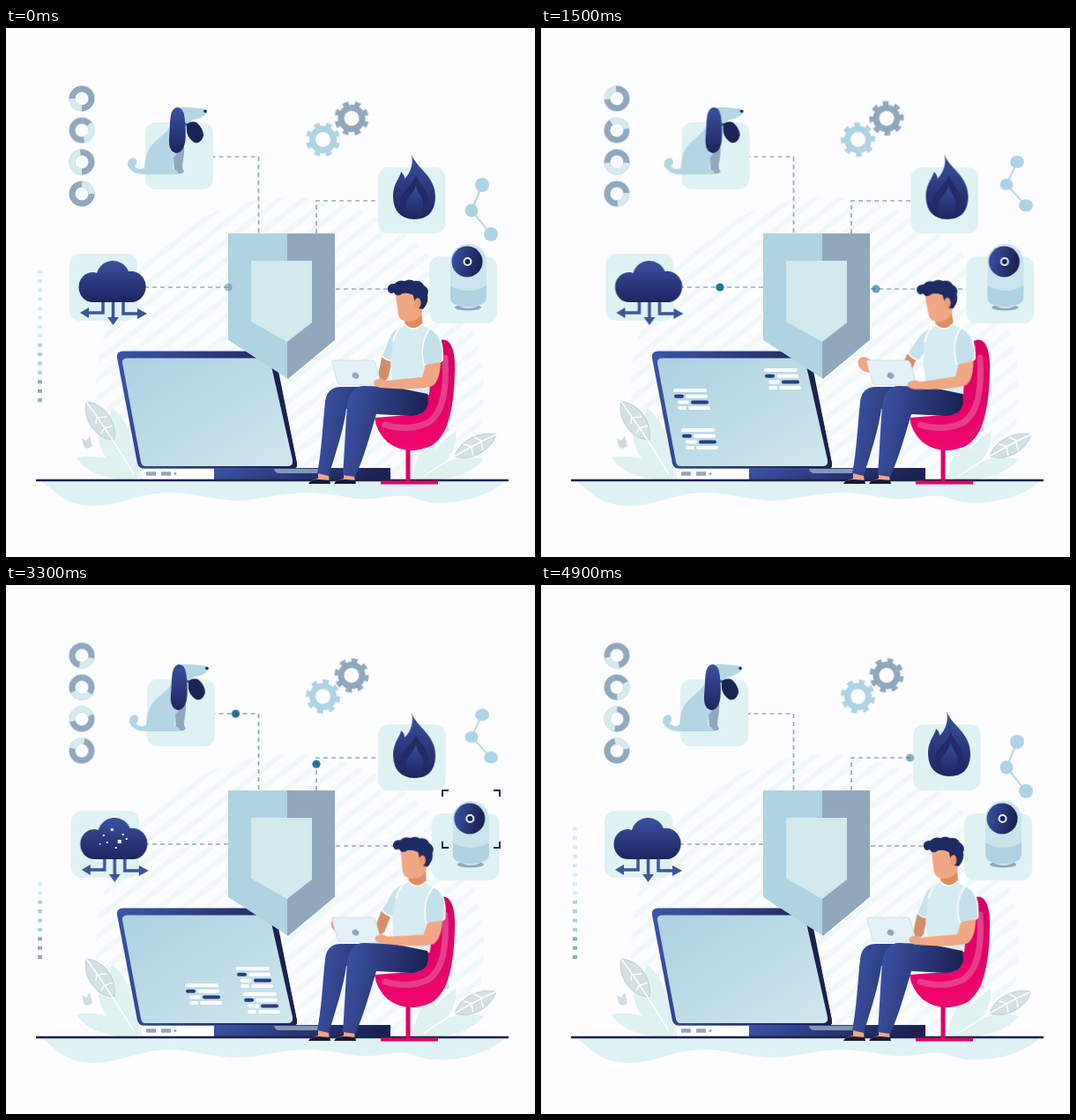
Write an HTML page that moves like this. It is 600 px wide and 600 px high and loops after 5000 ms.

```html
<!DOCTYPE html>
<html lang="en">
<head>
<meta charset="utf-8">
<title>Smart security</title>
<style>
html, body { margin: 0; width: 100%; height: 100%; overflow: hidden; background: #fdfcff; }
svg { display: block; width: 100vw; height: 100vh; }

/* half a sine wave each way, 5 s there and back */
.wave { animation: 2.5s cubic-bezier(.364, 0, .636, 1) infinite alternate; }
.mid { animation-delay: -1.25s; }
.drift { animation-name: drift; }
.turn { animation-name: turn; }
.back { animation-name: back; }
.gear { animation-name: gear; }
.atoms { animation-name: atoms; }
.sway { animation-name: sway; transform-origin: 458px 432px; }
@keyframes drift { to { transform: translateX(var(--dx)); } }
@keyframes turn { from { transform: rotate(-90deg); } to { transform: rotate(90deg); } }
@keyframes back { from { transform: rotate(90deg); } to { transform: rotate(-90deg); } }
@keyframes gear { from { transform: rotate(-45deg); } to { transform: rotate(90deg); } }
@keyframes atoms {
  from { transform: translateY(178px) scaleY(1); }
  to { transform: translateY(138px) scaleY(.82); }
}
@keyframes sway { from { transform: rotate(3deg); } to { transform: rotate(-3deg); } }

.loop { animation: 5s linear infinite; }
.fire { animation-name: fire; animation-timing-function: ease-in-out; }
@keyframes fire {
  0%, 100% { transform: none; }
  38% { transform: translateX(-2.7px); }
  80% { transform: translateX(1px); }
}
.bob { animation-name: bob; }
@keyframes bob { 0%, 44%, 94%, 100% { transform: none; } 62%, 84% { transform: translateY(2px); } }
.ladder { animation-name: ladder; }
@keyframes ladder {
  0%, 94%, 100% { clip-path: inset(0); }
  20% { clip-path: inset(88% 0 0); }
  26%, 41% { clip-path: inset(100% 0 0); }
  44% { clip-path: inset(88% 0 0); }
  66% { clip-path: inset(40% 0 0); }
  80% { clip-path: inset(12% 0 0); }
}
.spark { animation-name: spark; }
@keyframes spark {
  0%, 14%, 27%, 36%, 51%, 56%, 74%, 100% { opacity: 0; transform: translateY(5px); }
  18%, 24%, 41%, 47%, 60%, 69% { opacity: 1; transform: none; }
}
.corner { animation-name: corner; }
@keyframes corner {
  0%, 51% { transform: scale(.2); opacity: 0; }
  52% { transform: scale(.2); opacity: 1; }
  58%, 72% { transform: none; opacity: 1; }
  80% { transform: scale(.2); opacity: 1; }
  82%, 100% { transform: scale(.2); opacity: 0; }
}
.shine { animation-name: shine; }
@keyframes shine {
  0%, 69% { transform: translateX(-170px); }
  80% { transform: none; }
  92%, 100% { transform: translateX(185px); }
}
.hand { animation-name: hand; animation-timing-function: ease-in-out; }
@keyframes hand {
  0%, 6%, 80%, 100% { transform: translate(24px, 8px); }
  20% { transform: translate(4px, 7px); }
  30% { transform: none; }
  44% { transform: translate(3px, -1px); }
  66% { transform: translate(9px, 5px); }
}
.arm { animation-name: arm; transform-origin: 444px 344px; }
@keyframes arm { 0%, 6%, 80%, 100% { transform: none; } 28%, 46% { transform: rotate(16deg); } }
</style>
</head>
<body>
<svg viewBox="0 0 600 600" fill="none">
<defs>
  <linearGradient id="navy" x2="0" y2="1"><stop stop-color="#3a519f"/><stop offset="1" stop-color="#1d2560"/></linearGradient>
  <linearGradient id="leg" x1="0" x2="1" y2=".2"><stop stop-color="#3c55a8"/><stop offset="1" stop-color="#1b2152"/></linearGradient>
  <linearGradient id="glass" x2="1" y2="1"><stop stop-color="#abd1e1"/><stop offset="1" stop-color="#cfe7ee"/></linearGradient>
  <linearGradient id="pink" x2="0" y2="1"><stop stop-color="#d4005f"/><stop offset="1" stop-color="#f0066f"/></linearGradient>
  <pattern id="stripes" width="17" height="17" patternUnits="userSpaceOnUse" patternTransform="rotate(-38)"><path d="M0 4H17" stroke="#f0f8f9" stroke-width="6"/></pattern>
  <clipPath id="sky"><path d="M0 0H600V512H0z"/></clipPath>
  <clipPath id="shield"><path d="M252 233H373V354L320 398L252 354z"/></clipPath>
</defs>

<!-- backdrop -->
<circle cx="322" cy="412" r="220" fill="url(#stripes)" clip-path="url(#sky)"/>
<path d="M38 514C55 520 60 541 98 542C132 542 150 527 185 527S245 541 285 534S345 524 385 532S440 524 465 534S540 538 566 514z" fill="#dff2f3"/>
<g fill="#dff1f1">
  <path d="M146 510C118 490 112 455 120 431C138 442 148 475 152 510z"/>
  <path d="M146 510C118 500 104 480 104 457C126 462 142 485 150 510z"/>
  <path d="M150 511C120 515 90 505 80 487C108 482 135 494 150 511z"/>
  <path d="M468 510C480 485 494 466 510 458C513 480 494 502 474 512z"/>
  <path d="M468 512C490 490 520 483 542 489C526 508 495 515 468 512z"/>
  <path d="M462 510C462 492 472 474 486 468C490 485 480 502 466 512z"/>
</g>
<g fill="#d3e0e4" stroke="#b4c6cd" stroke-width=".8">
  <path d="M91 424C110 425 126 445 123 467C105 468 86 446 91 424z"/>
  <path d="M91 424Q112 452 145 506M103 440L102 449M112 453L108 460M104 442L114 441M112 454L121 451" fill="none" stroke="#fff" stroke-width="1.4"/>
  <path d="M556 461C537 457 514 468 509 486C528 491 549 481 556 461z"/>
  <path d="M556 461Q522 476 474 508M541 469L531 464M530 475L519 472M539 470L541 479M528 476L530 485" fill="none" stroke="#fff" stroke-width="1.4"/>
</g>
<path d="M86 465L91 468L95 462L98 474Q91 480 88 474zM496 450L500 446L503 457L496 459z" fill="#cfdde2"/>

<!-- left column -->
<g id="rings"></g>
<g id="ladder" class="loop ladder"></g>

<!-- gears -->
<g id="gears"></g>

<!-- molecule -->
<g class="wave atoms">
  <path d="M540 0L528 29L550 56" stroke="#b6d7e5" stroke-width="2"/>
  <g fill="#aed3e4"><circle cx="540" r="8"/><circle cx="528" cy="29" r="7.5"/><circle cx="550" cy="56" r="8"/></g>
</g>

<!-- wires -->
<g stroke="#91abc1" stroke-width="1.7" stroke-dasharray="5 4">
  <path d="M286.500 232V146H235"/><path d="M352 233V196H422"/>
  <path d="M252 294H158"/><path d="M374 296H482"/>
</g>

<!-- dog -->
<g class="wave drift" style="--dx:2.4px">
  <rect x="158" y="107" width="77" height="76" rx="12" fill="#dff2f3"/>
  <path d="M191 130L202 135C203 147 198 157 201 161Q205 166 191 165L190 148z" fill="#90a8bd"/>
  <path d="M188 106C184 122 166 126 160 142Q157 150 157 159Q150 162 146 157Q151 150 145 147Q137 148 138 156Q143 167 160 166H195Q196 161 189 160L190 147Q201 136 205 112z" fill="#b4d6e4"/>
  <path d="M190 94Q196 89 206 90L224 91.500Q230 93 227 97Q222 103 211 104L206 116L190 114z" fill="#b4d6e4"/>
  <path d="M188 104L209 111" stroke="#27808f" stroke-width="3"/>
  <path d="M205 109Q210 105 216 107Q224 114 224 122Q221 132 214 130Q207 126 205 118z" fill="#1c2456"/>
  <path d="M194 90Q202 90 203 105C204 120 206 139 194 142Q184 141 185 125C187 110 184 92 194 90z" fill="url(#navy)"/>
  <circle cx="226" cy="94.500" r="1.800" fill="#1c2456"/>
</g>

<!-- cloud -->
<g class="wave drift" style="--dx:2.2px">
  <rect x="72" y="256" width="77" height="76" rx="12" fill="#dff2f3"/>
  <path d="M110 308V323H91M121.500 308V331M133 308V324H153" stroke="#3d5599" stroke-width="3.500"/>
  <path d="M84 323L94 317V329zM121.500 337L115 328H128zM160 324L149 318V330z" fill="#3d5599"/>
  <path d="M99 311A16 17 0 0 1 98 277Q101 277 103 278A19 19 0 0 1 139 276A17 17.500 0 1 1 144 311z" fill="url(#navy)"/>
  <g id="sparks" class="loop spark" fill="#fff"></g>
</g>

<!-- flame -->
<g class="loop fire">
  <rect x="422" y="158" width="76.500" height="75" rx="12" fill="#dff2f3"/>
  <g class="loop bob">
    <path d="M460 143C465 159 487 167 487 192Q486 217 463 217Q440 216 439 192C439 176 446 172 448 163Q452 166 452 171C460 163 462 153 460 143z" fill="url(#navy)"/>
    <path d="M465 166C466 176 480 183 479 198Q477 214 463 215Q447 213 447 197C448 183 462 180 465 166z" fill="#212b66"/>
    <path d="M465 178C465 187 474 191 473 201Q471 214 463 215Q453 212 453 201C454 192 463 188 465 178z" fill="url(#navy)"/>
  </g>
</g>

<!-- camera -->
<g class="wave drift" style="--dx:3.600px">
  <rect x="480" y="259" width="77" height="76" rx="12" fill="#dff2f3"/>
  <ellipse cx="524" cy="317" rx="15" ry="3.500" fill="#90a8bd"/>
  <rect x="504" y="245" width="41" height="73" rx="20" fill="#c9e4ed"/>
  <path d="M504 292Q524 304 545 292V306Q544 316 524 316T504 306z" fill="#aed3e3"/>
  <circle cx="523" cy="265" r="17.500" fill="url(#leg)"/>
  <circle cx="523.500" cy="265" r="4" fill="#1b2457" stroke="#e8f5f8" stroke-width="2"/>
</g>
<g id="corners" stroke="#1c2559" stroke-width="2"></g>

<!-- laptop -->
<path d="M133 366.500H296Q303 366.500 305 373L330 494Q331 500 324 500H157Q151 500 149 494L126 374Q125 366.500 133 366.500z" fill="url(#leg)"/>
<path d="M297 366.500Q304 367 306 374L330 494Q331 500 324 500L317 499L322 488z" fill="#1a2250"/>
<path d="M138 374.500H294Q299 374.500 300 379L325 490Q326 497 320 497H158Q154 497 153 492L132 380Q131 374.500 138 374.500z" fill="url(#glass)"/>
<g id="code" stroke-linecap="round" stroke-width="4"></g>
<path d="M152 500H236V513H154z" fill="#fff" stroke="#dbe5ec" stroke-width=".8"/>
<path d="M159 505.500H170M176 505.500H187" stroke="#90a8bd" stroke-width="4.500"/><circle cx="192" cy="505.500" r="1.500" fill="#90a8bd"/>
<path d="M236 499H436V513H236z" fill="url(#leg)"/>
<path d="M304 500H358V505H310Q305 505 304 500z" fill="#8298b5"/>
<path d="M35 513H569" stroke="#1b2250" stroke-width="2.400" stroke-linecap="round"/>

<!-- shield -->
<g clip-path="url(#shield)">
  <path d="M252 233H319V398L252 354z" fill="#aed3e2"/>
  <path d="M319 233H373V354L319 399z" fill="#90a8bd"/>
  <path d="M278 264H347V334L319 356L278 333z" fill="#d2e9ee"/>
  <path class="loop shine" d="M330 233H378L271 398H222z" fill="#4598b6" opacity=".48"/>
</g>
<g id="dots" fill="#1f7594"></g>

<!-- chair -->
<path d="M456 476V516" stroke="#e00063" stroke-width="5"/>
<path d="M425 515.500H490" stroke="#e00063" stroke-width="4"/>
<path d="M488 357Q495 351 501 355Q510 363 509 390C508 430 502 463 482 474Q455 486 433 470Q420 458 418 442L470 438Q479 420 482 385z" fill="url(#pink)"/>
<path d="M498 374C500 410 496 437 478 448Q455 458 430 450" stroke="#e63d8a" stroke-width="7" stroke-linecap="round"/>

<!-- man -->
<path d="M354 504L366 507L367 517H343Q344 513 354 511z" fill="#f0a783"/>
<path d="M383 505L395 507L396 517H372Q374 513 383 511z" fill="#f0a783"/>
<path d="M343 517Q345 512 355 512L367 513L368 517zM372 517Q374 512 385 512L396 513L397 517z" fill="#171a33"/>
<path d="M380 407Q364 407 362 424C359 452 358 480 353 505L366 508C374 482 383 455 386 432L440 432L445 407z" fill="url(#leg)"/>
<g class="wave mid sway">
  <g class="loop arm">
    <path d="M434 366L428 394" stroke="#d38e69" stroke-width="12" stroke-linecap="round"/>
    <path d="M450 336Q438 342 434 352L426 372Q432 378 441 378L450 356z" fill="#c6e3ed" stroke="#fff" stroke-width="1.500"/>
  </g>
  <path d="M453 322L471 320L473 342Q462 348 452 340z" fill="#e28b60"/>
  <path d="M452 336Q442 341 439 356L436 380L439 412L480 416L483 380L495 377C496 362 494 348 483 342L472 336Q462 346 452 336z" fill="#d5ecf2"/>
  <path d="M474 382C471 368 472 352 481 341Q495 347 495 377Q486 385 474 382z" fill="#c2e1eb"/>
  <path d="M481 341C472 352 471 368 474 382Q486 385 495 377C496 362 494 348 483 342L472 336Q462 346 452 336Q442 341 439 356" stroke="#fff" stroke-width="1.600"/>
  <path d="M442 303Q443 296 456 295L471 302L472 322Q468 333 456 333Q447 333 445 325z" fill="#f0a783"/>
  <path d="M433 297Q432 290 441 290Q445 285 452 287Q458 284 463 287Q471 286 474 292Q481 296 478 303Q480 311 473 319L468 318L467 310Q463 312 462 303Q456 300 450 301Q443 306 440 300Q435 303 433 297z" fill="#1d2a63"/>
  <ellipse cx="467" cy="312" rx="3.600" ry="6" fill="#ee9a70"/>
</g>
<path d="M439 407L478 415Q483 438 460 440L420 438C412 465 405 490 396 509L382 507C384 480 385 452 387 428Q390 406 406 406z" fill="url(#leg)"/>
<g class="loop hand">
  <path d="M362 386Q357 379 362 374Q368 371 373 376L379 382L378 391Q367 392 362 386z" fill="#f0a783"/>
</g>
<path d="M371 377H415Q418 377 419 380L425 402Q425 405 421 405H381Q377 405 376 402L370 380Q369 377 371 377z" fill="#e3f0f6" stroke="#c9dde8" stroke-width=".8"/>
<ellipse cx="396.500" cy="394" rx="4" ry="3.300" fill="#90a8bd" transform="rotate(25 396 394)"/>
<g class="wave mid sway">
  <path d="M476 382L493 379Q492 400 484 406Q472 410 440 409L424 408Q415 406 418 400Q424 396 432 400L472 396z" fill="#f0a783"/>
</g>
</svg>
<script>
const $ = id => document.getElementById(id);
const LOOP = 5000;
const forever = { duration: LOOP, iterations: Infinity };

function add(parent, tag, attrs) {
  const el = document.createElementNS('http://www.w3.org/2000/svg', tag);
  for (const k in attrs) el.setAttribute(k, attrs[k]);
  return parent.appendChild(el);
}

// rings: light share in quarters, middle angle of its start, direction
[[1, 90, 'turn'], [1.3, -40, 'back'], [1.9, 90, 'back'], [1, -90, 'turn']].forEach(([part, from, way], i) => {
  const place = add($('rings'), 'g', { transform: `translate(86 ${80 + 36 * i}) rotate(${from})`, 'stroke-width': 7 });
  const g = add(place, 'g', { class: `wave mid ${way}` });
  add(g, 'circle', { r: 11, stroke: '#90a8bd' });
  add(g, 'circle', { r: 11, stroke: '#d3eaee', pathLength: 4, 'stroke-dasharray': `${part} ${4 - part}` });
});

for (let i = 0; i < 15; i++)
  add($('ladder'), 'rect', {
    x: 36, y: 274.5 + 10.4 * i, width: 5, height: 4,
    fill: i < 8 ? '#d5ecef' : i < 12 ? '#aad2e1' : '#90a8bd'
  });

[[359.5, 126.5, '#aed3e4'], [392, 102.5, '#90a8bd']].forEach(([x, y, stroke]) => {
  const place = add($('gears'), 'g', { transform: `translate(${x} ${y})`, stroke });
  const g = add(place, 'g', { class: 'wave mid gear' });
  add(g, 'circle', { r: 12, 'stroke-width': 7 });
  add(g, 'circle', { r: 17.3, 'stroke-width': 4.5, pathLength: 16, 'stroke-dasharray': '1 1', 'stroke-dashoffset': .5 });
});

[[117, 276, 3], [125, 289, 4], [108, 283, 2], [130, 282, 2], [112, 291, 2], [122, 297, 2], [134, 287, 2], [104, 293, 1.5]]
  .forEach(([x, y, s]) => add($('sparks'), 'rect', { x, y, width: s, height: s }));

for (const [x, sx] of [[495, 1], [560, -1]])
  for (const [y, sy] of [[233, 1], [298, -1]]) {
    const g = add($('corners'), 'g', { transform: `translate(${x} ${y}) scale(${sx} ${sy})` });
    add(g, 'path', { class: 'loop corner', d: 'M0 7V0H7', 'vector-effect': 'non-scaling-stroke' });
  }

// code rows: row, from, to, dark
const rows = [[0, 2, 36], [1, 3, 10, 1], [1, 16, 37], [2, 7, 16], [2, 22, 38, 1], [3, 7, 13], [3, 19, 40]];

function block(x, y, start, end) {
  for (const [row, from, to, dark] of rows) {
    const line = add($('code'), 'path', {
      d: `M${x + from} ${y + 2 + 6.7 * row}H${x + to}`, stroke: dark ? '#2a3b82' : '#fff'
    });
    const t0 = (start + row * 80 + from * 3) / LOOP, t1 = end / LOOP;
    const shut = `inset(-3px ${to - from + 4}px -3px -3px)`, open = 'inset(-3px)';
    line.animate([
      { offset: 0, opacity: 0, clipPath: shut },
      { offset: t0, opacity: 0, clipPath: shut },
      { offset: t0 + .012, opacity: 1, clipPath: shut },
      { offset: t0 + .045, opacity: 1, clipPath: open },
      { offset: t1, opacity: 1, clipPath: open },
      { offset: t1 + .07, opacity: 0, clipPath: open },
      { offset: 1, opacity: 0, clipPath: open }
    ], forever);
  }
}
block(150, 409, 500, 1750);
block(159, 454, 900, 2250);
block(253, 386, 950, 2300);
block(261, 433, 2500, 3900);
block(269, 462, 2600, 3900);
block(203, 452, 2650, 4050);

// a dot that runs along a line with at most one bend, once per start time
function runner(points, starts, dur) {
  const seg = points.slice(1).map((p, i) => Math.hypot(p[0] - points[i][0], p[1] - points[i][1]));
  const total = seg.reduce((a, b) => a + b);
  const at = f => {
    let d = f * total, i = 0;
    while (i < seg.length - 1 && d > seg[i]) d -= seg[i++];
    const [a, b] = [points[i], points[i + 1]], k = d / seg[i];
    return `translate(${a[0] + (b[0] - a[0]) * k}px, ${a[1] + (b[1] - a[1]) * k}px)`;
  };
  const keys = [];
  const key = (t, f, opacity) => keys.push({ offset: t / LOOP, transform: at(f), opacity });
  const stops = [...new Set([0, .12, seg[0] / total, .88, 1])].sort((a, b) => a - b);
  key(0, 0, 0);
  for (const s of starts) {
    key(Math.max(0, s - 1), 0, 0);
    for (const f of stops) key(s + f * dur, f, f % 1 ? 1 : .4);
    key(s + dur + 1, 1, 0);
  }
  key(LOOP, 1, 0);
  add($('dots'), 'circle', { r: 4.6 }).animate(keys, forever);
}
runner([[286.5, 232], [286.5, 146], [235, 146]], [1810, 2860, 3910], 540);
runner([[352, 233], [352, 196], [422, 196]], [2030, 3040, 4000], 930);
runner([[252, 294], [160, 294]], [0, 1100, 2170], 750);
runner([[374, 296], [480, 296]], [1450, 2470, 3490], 900);

// the whole scene advances ten times a second
const all = document.getAnimations();
all.forEach(a => a.pause());
let begin;
function tick(now) {
  begin ??= now;
  const t = Math.floor((now - begin + 30) / 100) * 100 % LOOP;
  for (const a of all) a.currentTime = t;
  requestAnimationFrame(tick);
}
requestAnimationFrame(tick);
</script>
</body>
</html>
```
